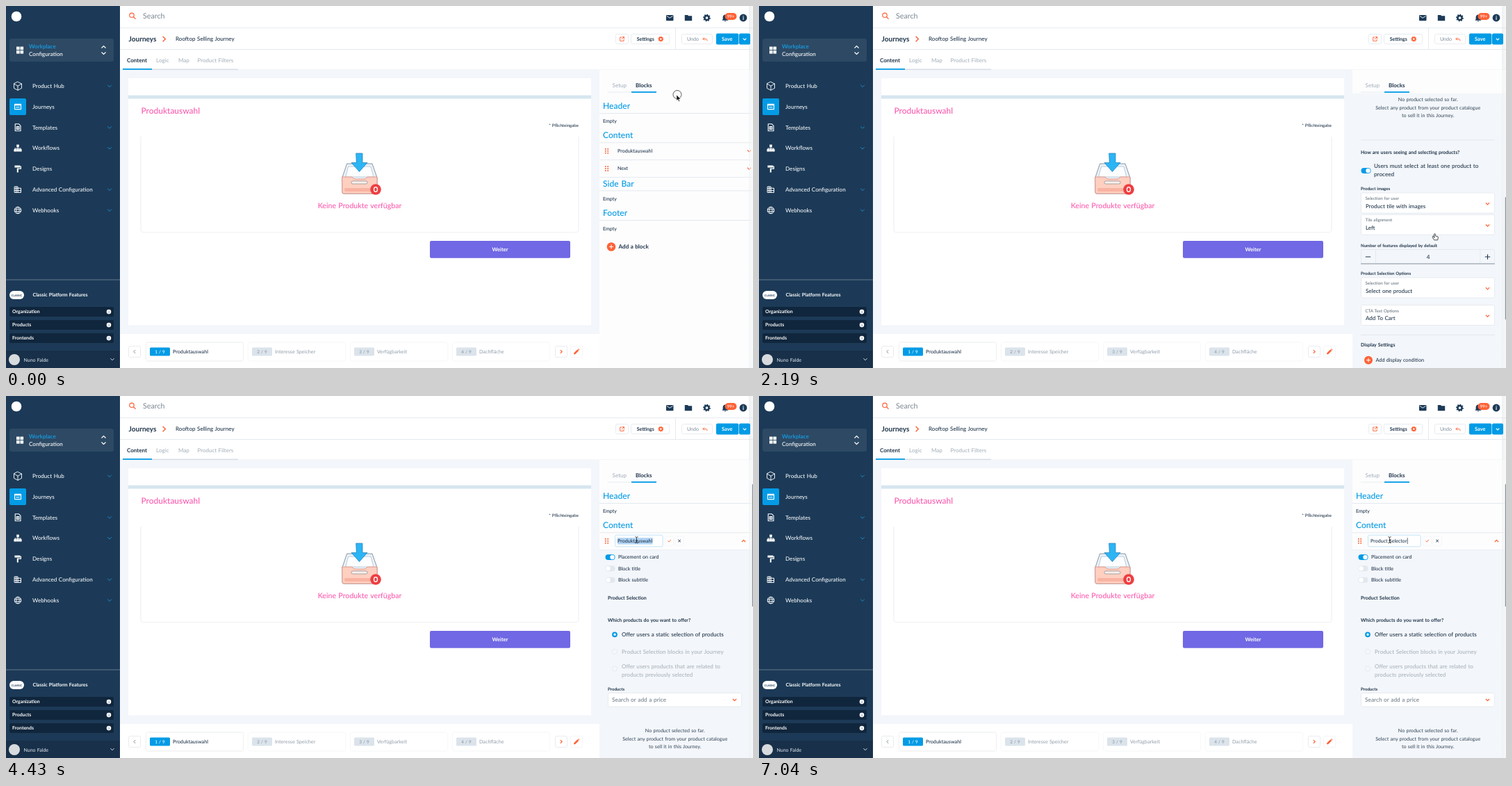
Write an HTML page that moves like this. It is 1075 by 521 pixels and loops after 8000 ms.

```html
<!DOCTYPE html>
<html lang="en">
<head>
<meta charset="utf-8">
<title>Journey builder</title>
<style>
  html, body { margin: 0; width: 100%; height: 100%; overflow: hidden; background: #fff; }
  svg { display: block; width: 100vw; height: 100vh; }
  text { font-family: Lato, "Open Sans", sans-serif; word-spacing: .06em; text-rendering: geometricPrecision; white-space: pre; }
  .card { filter: drop-shadow(0 .6px .8px rgba(40, 60, 80, .2)); }
</style>
</head>
<body>
<svg id="stage" viewBox="0 0 1075 521" preserveAspectRatio="none"></svg>
<script>
const NAVY = '#1c3a57', INK = '#20354b', BLUE = '#039be5', ORANGE = '#ff6136', PINK = '#fb5aae';
const GREY = '#a9b3bd', LINE = '#e2e7ec', WHITE = '#fff', TINT = '#f3f6fa';

// Drawing helpers
const text = (x, y, size, str, fill = INK, weight = 500, anchor = 'start') =>
  `<text x="${x}" y="${y}" font-size="${size}" fill="${fill}" font-weight="${weight}" text-anchor="${anchor}">${str}</text>`;
const bold = (x, y, size, str, fill = INK) => text(x, y, size, str, fill, 700);
const rect = (x, y, w, h, fill, r = 0, more = '') =>
  `<rect x="${x}" y="${y}" width="${w}" height="${h}" rx="${r}" fill="${fill}" ${more}/>`;
const frame = (x, y, w, h, stroke = LINE, r = 2, fill = WHITE) =>
  rect(x + .5, y + .5, w - 1, h - 1, fill, r, `stroke="${stroke}" stroke-width=".8"`);
const circle = (x, y, r, fill, more = '') => `<circle cx="${x}" cy="${y}" r="${r}" fill="${fill}" ${more}/>`;
const hline = (x, y, w, color = LINE, h = .8) => rect(x, y, w, h, color);
const stroke = (x, y, d, color, w = 1, fill = 'none') =>
  `<path transform="translate(${x} ${y})" d="${d}" fill="${fill}" stroke="${color}" stroke-width="${w}" stroke-linejoin="round" stroke-linecap="round"/>`;
const solid = (x, y, d, color) => `<path transform="translate(${x} ${y})" d="${d}" fill="${color}"/>`;
const chevron = (x, y, turn, color, s = 2.6, w = 1.2) =>
  `<path transform="translate(${x} ${y}) rotate(${turn})" d="M${-s} ${-s / 2}L0 ${s / 2}L${s} ${-s / 2}" fill="none" stroke="${color}" stroke-width="${w}"/>`;
const gear = (x, y, r, color) =>
  circle(x, y, r * .62, 'none', `stroke="${color}" stroke-width="${r * .5}"`) +
  circle(x, y, r * .9, 'none', `stroke="${color}" stroke-width="${r * .35}" pathLength="16" stroke-dasharray="1 1"`);
const info = (x, y, r, bg, fg) => circle(x, y, r, bg) + bold(x - r * .18, y + r * .55, r * 1.5, 'i', fg);
const plus = (x, y, r) => circle(x, y, r, ORANGE) + stroke(x, y, 'M-2.6 0H2.6M0-2.6V2.6', WHITE, 1.1);
const pencil = (x, y, k = 1) =>
  `<g transform="translate(${x} ${y}) scale(${k})">${solid(0, 0, 'M-4 4V2L1.5-3.5L3.5-1.5L-2 4ZM2.2-4.1L3-4.8L4.8-3L4.1-2.2Z', ORANGE)}</g>`;
const toggle = (x, y, on) =>
  rect(x - 7, y - 4, 14, 8, on ? BLUE : '#e1e8ee', 4) + circle(x + (on ? 3 : -3), y, 3.2, WHITE);
const radio = (x, y, on) => on
  ? circle(x, y, 2.8, WHITE, `stroke="${BLUE}" stroke-width="2.2"`)
  : circle(x, y, 3.6, '#f5f7fa', 'stroke="#e4e9ee" stroke-width=".8"');
const field = (y, label, value) =>
  frame(866, y, 193, 30) + text(872.5, y + 10.5, 6.2, label, '#66737f') +
  text(873, y + 22, 8, value) + chevron(1048.5, y + 16, 0, ORANGE);

function sidebar() {
  const items = ['Product Hub', 'Journeys', 'Templates', 'Workflows', 'Designs', 'Advanced Configuration', 'Webhooks'];
  const rowY = i => 115.2 + i * 29.8;
  let s = rect(0, 0, 164, 521, NAVY) + circle(15, 15, 7.3, WHITE);
  s += rect(5, 47, 150, 33, '#2d4964', 3);
  for (const [x, y] of [[15, 58.5], [20.5, 58.5], [15, 64], [20.5, 64]]) s += rect(x, y, 4.6, 4.6, WHITE);
  s += text(33, 61, 8.2, 'Workplace', '#14a5ef') + text(33, 71.8, 8.1, 'Configuration', WHITE);
  s += chevron(140.5, 59, 180, WHITE, 3) + chevron(140.5, 68, 0, WHITE, 3);
  s += rect(5, 133, 24, 24, BLUE, 2);
  items.forEach((name, i) => {
    s += text(38, rowY(i) + 2.7, 8.1, name, '#f3f6f9');
    if (![1, 4].includes(i)) s += chevron(149, rowY(i), 0, '#1988c6', 2.8, 1);
  });
  s += stroke(17, rowY(0), 'M0-6L5.5-3.2V3.2L0 6L-5.5 3.2V-3.2ZM-5.5-3.2L0 0L5.5-3.2M0 0V6', WHITE, .9);
  s += stroke(17, rowY(1), 'M-4.5-3.6H4.5V3.6H-4.5ZM-4.5-2.4H4.5M-2.3 .8H2.3', WHITE, 1.1);
  s += stroke(17, rowY(2), 'M-3.8-5H1.5L4-2.5V5H-3.8ZM-1.8-1.2H2V2.6H-1.8ZM0-1V2.5', WHITE, 1.1);
  s += solid(17, rowY(3), 'M-1.8-5H1.8V-1.5H.5V0H4.6V1.5H5.6V5H2V1.5H3.4V1H.5V1.5H1.8V5H-1.8V1.5H-.5V1H-3.4V1.5H-2V5H-5.6V1.5H-4.6V0H-.5V-1.5H-1.8Z', WHITE);
  s += solid(17, rowY(4), 'M-4.6-5H3.2V-4H5V.4H.8V5.2H-1.2V-.8H3.8V-2.8H3.2V-1.8H-4.6Z', WHITE);
  s += stroke(17, rowY(5), 'M-4.5-4.2H0V4.2H-4.5ZM0-2H4.5V4.2H0M-4.5-1.5H0M-4.5 1.4H4.5M-2.3-4V4', WHITE, 1);
  s += circle(17, rowY(6), 4.8, 'none', `stroke="${WHITE}" stroke-width="1"`) +
    stroke(17, rowY(6), 'M-4.5-1.6H4.5M-4.5 1.6H4.5M0-4.8C-3-2-3 2 0 4.8C3 2 3-2 0-4.8', WHITE, .9);

  s += hline(0, 393.6, 164, '#75879a') + rect(5, 410, 21, 12, WHITE, 6) + text(15.5, 417.5, 3.9, 'CLASSIC', NAVY, 700, 'middle');
  s += bold(38.5, 418.4, 7, 'Classic Platform Features', WHITE);
  ['Organization', 'Products', 'Frontends'].forEach((name, i) => {
    const y = 433 + i * 19;
    s += rect(5, y, 150, 14, '#10263d', 2) + bold(9, y + 9.4, 6.9, name, WHITE) + info(148, y + 7.1, 3.3, WHITE, NAVY);
  });
  s += rect(0, 496, 164, 25, '#183049') + circle(12, 509, 8, '#d8dbde');
  return s + text(25.5, 511.5, 7, 'Nuno Falde', '#d6dee6') + chevron(153, 508.5, 0, '#d6dee6', 2.6, 1);
}

function header() {
  let s = rect(1069, 0, 6, 521, 'url(#edge)');
  s += circle(181, 13.3, 3.2, 'none', `stroke="${ORANGE}" stroke-width="1.2"`) + stroke(183.6, 15.8, 'M0 0L2.6 2.6', ORANGE, 1.3);
  s += text(197, 17.6, 10.7, 'Search', '#7b8792', 400);
  s += rect(950, 13, 10.5, 8.2, NAVY, 1) + stroke(955.2, 15.4, 'M-4-.8L0 1.8L4-.8', WHITE, .9);
  s += solid(982, 17, 'M-5.2-4H-1L.2-2.8H5.2V4.2H-5.2Z', NAVY) + gear(1008.5, 17, 5, NAVY);
  s += solid(1035, 17.2, 'M-4.6 3.6L-3.4 2V-1C-3.4-3.4-1.8-4.8 0-4.8C1.8-4.8 3.4-3.4 3.4-1V2L4.6 3.6ZM-1.4 4.2H1.4C1 5.6-1 5.6-1.4 4.2', NAVY);
  s += rect(1034.5, 10, 17, 10, ORANGE, 5) + text(1043, 17.2, 6, '99+', WHITE, 500, 'middle') + info(1061, 17, 5.4, NAVY, WHITE);
  s += hline(164, 31, 911) + hline(164, 62, 911) + rect(963, 31, .8, 31, LINE);

  s += bold(176.5, 51, 10.1, 'Journeys') + chevron(227.5, 47.5, -90, ORANGE, 3.8, 1.4) + text(244, 50, 8.05, 'Rooftop Selling Journey');
  s += frame(877, 40, 19, 15) + stroke(886.5, 47.5, 'M-.5-2.6H-2.8V2.8H2.6V.5M.8-3H3V-.8M3-3L-.4 .4', ORANGE, .9);
  s += frame(899, 40, 56, 15) + bold(907.7, 50, 7.05, 'Settings') + gear(942.3, 47.5, 3.6, ORANGE);
  s += frame(972, 40, 45, 15) + text(980, 50, 7.1, 'Undo', '#8793a0') + stroke(1006, 48, 'M-3-.6H1C2.5-.6 3 .4 3 1.8M-1.2-2.4L-3-.6L-1.2 1.2', ORANGE, .9);
  s += rect(1022, 39.5, 32.4, 16, BLUE, 2) + bold(1030, 50, 7.4, 'Save', WHITE);
  s += rect(1055, 39.5, 16, 16, BLUE, 2) + chevron(1063, 47.7, 0, WHITE, 2.2);

  s += bold(174, 80.5, 8, 'Content');
  s += text(216, 80.5, 8.1, 'Logic', GREY) + text(248, 80.5, 8, 'Map', GREY) + text(275.5, 80.5, 7.95, 'Product Filters', GREY);
  return s + hline(164, 91.4, 911, '#eef1f4') + hline(210, 90.6, 124, '#cfd8e0', 1.2) + hline(168, 90, 42, BLUE, 1.8);
}

function canvasArea() {
  let s = rect(164, 92, 690, 380, TINT) + rect(176, 104, 666, 355.5, WHITE) + rect(176, 128.5, 666, 5, '#d6e6f0');
  s += text(194.5, 155.3, 11.95, 'Produktauswahl', PINK) + text(824, 174.3, 6.1, '* Pflichteingabe', INK, 500, 'end');
  s += rect(194.5, 186, 629, 139, WHITE, 3, 'class="card"') + rect(193, 182, 632, 6, WHITE);

  // Empty tray with arrow
  const edge = '#6b7a89';
  s += stroke(0, 0, 'M491 227H527L534 247V268Q534 270 532 270H486Q484 270 484 268V247Z', edge, .8, '#eaf3fa');
  s += stroke(0, 0, 'M493 231H525L529 246H489Z', '#a9b8c6', .7, '#fbfdff');
  s += stroke(0, 0, 'M484 246H498Q500 249 503 249H515Q518 249 520 246H534V268Q534 270 532 270H486Q484 270 484 268Z', '#d88c7f', .8, '#ffcfc0');
  s += rect(487, 262, 40, 5, '#f9b3a2', 2) + rect(497, 252, 23, 4, '#fff0ea', 2, `stroke="${edge}" stroke-width=".6"`);
  s += stroke(508.5, 212, 'M-4.5 0H4.5V13.5H11.5L0 26.5L-11.5 13.5H-4.5Z', '#2e86bc', .8, '#2bb5f5');
  s += circle(532, 264, 7.8, '#ee3e42') + `<ellipse cx="532" cy="264" rx="2.5" ry="3.4" fill="none" stroke="#fff" stroke-width="1.3"/>`;
  s += text(509, 290.8, 10.6, 'Keine Produkte verfügbar', PINK, 500, 'middle');
  s += rect(610, 338, 202, 24.7, '#7068e4', 2) + text(711, 353, 7.6, 'Weiter', WHITE, 700, 'middle');

  s += rect(164, 472, 690, 49, WHITE) + frame(176, 489, 18, 17) + chevron(185, 497.5, 90, '#7d8a97', 2.4, 1);
  ['Produktauswahl', 'Interesse Speicher', 'Verfügbarkeit', 'Dachfläche'].forEach((name, i) => {
    const x = 202 + i * 147, on = i === 0;
    s += rect(x, 484.5, 139, 26, WHITE, 2, on ? 'class="card"' : 'class="card" opacity=".5"');
    s += rect(x + 5, 491.5, 29, 12, on ? BLUE : '#dbe3eb', 1.5) +
      text(x + 19.5, 499.8, 6.4, `${i + 1} / 9`, on ? WHITE : '#8d9aa8', 500, 'middle');
    s += text(x + 38, 500, 7.2, name, on ? INK : '#98a4b0');
  });
  return s + frame(790, 489, 18, 17) + chevron(799, 497.5, -90, ORANGE, 2.4, 1.2) + frame(812, 489, 18, 17, '#f0f3f5') + pencil(821, 497.5, .95);
}

function settings() {
  let s = rect(854, 221, 221, 647, TINT);
  [['Placement on card', 232], ['Block title', 248.3], ['Block subtitle', 264.7]].forEach(([name, y], i) => {
    s += toggle(869.5, y, i === 0) + text(881, y + 2.4, 7.1, name);
  });
  s += bold(866, 293, 7, 'Product Selection') + bold(866, 325.3, 6.95, 'Which products do you want to offer?');
  s += radio(876, 343.3, true) + text(886, 346.2, 8.1, 'Offer users a static selection of products');
  s += radio(876, 368) + text(886, 370.7, 8.1, 'Product Selection blocks in your Journey', GREY);
  s += radio(876, 392.5) + text(886, 391.7, 8.1, 'Offer users products that are related to', GREY) + text(886, 404, 8.1, 'products previously selected', GREY);
  s += bold(866, 423.7, 6.1, 'Products') + frame(866, 427, 193, 20.5) + text(872, 440, 8.3, 'Search or add a price', '#74808c') + chevron(1048.5, 437.3, 0, ORANGE);
  ['No product selected so far.', 'Select any product from your product catalogue', 'to sell it in this Journey.'].forEach((str, i) => {
    s += text(962.7, 484 + i * 11.5, 7.1, str, '#3f5062', 500, 'middle');
  });
  s += hline(866, 539.5, 193) + bold(866, 559.6, 6.95, 'How are users seeing and selecting products?');
  s += toggle(873.5, 584, true) + text(885, 580, 8.2, 'Users must select at least one product to') + text(885, 592, 8.2, 'proceed');
  s += bold(866, 612, 6.1, 'Product images') + field(615.5, 'Selection for user', 'Product tile with images') + field(646.8, 'Tile alignment', 'Left');
  s += bold(866, 694, 6.1, 'Number of features displayed by default') + frame(866, 697, 193, 21, LINE, 2, TINT) + hline(866, 717.5, 193, '#8b96a1', 1);
  s += rect(887, 698, .8, 19, LINE) + rect(1037.5, 698, .8, 19, LINE);
  s += stroke(876.5, 708, 'M-3.3 0H3.3', INK, 1.1) + text(963, 711, 8.1, '4', INK, 500, 'middle') + stroke(1048.5, 708, 'M-3.3 0H3.3M0-3.3V3.3', INK, 1.1);
  s += bold(866, 734, 6.1, 'Product Selection Options') + field(737.5, 'Selection for user', 'Select one product') + field(777, 'CTA Text Options', 'Add To Cart');
  return s + hline(866, 820, 193) + bold(866, 837, 6.95, 'Display Settings') + plus(877, 856.7, 6) + text(887.5, 859.3, 7.25, 'Add display condition');
}

function panel() {
  const title = (y, str) => text(859, y, 12.1, str, BLUE) + hline(854, y + 6, 221, '#dfe5ea');
  const empty = y => text(859, y, 7.05, 'Empty');
  const dots = y => [-3, 0, 3].map(d => circle(862.8, y + d, 1, ORANGE) + circle(866.2, y + d, 1, ORANGE)).join('');
  let s = rect(854, 92, 221, 429, '#fdfdfe');
  s += text(872.5, 117, 8.1, 'Setup', GREY) + bold(906, 117, 8, 'Blocks');
  s += hline(866, 123.6, 34, '#e3e8ec') + hline(900, 123, 36, BLUE, 1.8);
  s += `<g clip-path="url(#view)"><g id="scroll">${title(148, 'Header')}${empty(168)}${title(190.4, 'Content')}`;
  s += dots(208.7) + hline(854, 221, 221) + `<g id="toggleIcon">${chevron(0, 0, 0, ORANGE)}</g>`;
  s += `<g id="label">${text(880, 211, 7.1, 'Produktauswahl')}</g><g id="hover">${pencil(939.5, 208.7, .75)}</g>`;
  s += `<g id="editor">${rect(876.5, 200.2, 68, 16.6, WHITE, 2, 'id="box" stroke="#bfe1f6" stroke-width=".9"')}
    ${rect(880, 204, 50.5, 9.5, '#b3d5f6', 0, 'id="selection"')}${text(880, 211, 7.1, '').replace('<text', '<text id="typed"')}
    ${rect(0, 204, .7, 9, INK, 0, 'id="caret"')}
    <g id="actions">${frame(2.5, 201.5, 13, 14, '#f0f3f5') + frame(17, 201.5, 13, 14, '#f0f3f5')}
    ${stroke(9, 208.5, 'M-2 .2L-.6 1.6L2-1.5', ORANGE, .9) + stroke(23.5, 208.5, 'M-1.5-1.5L1.5 1.5M1.5-1.5L-1.5 1.5', INK, 1)}</g></g>`;
  s += `<g clip-path="url(#fold)">${settings()}</g>`;
  s += `<g id="rest">${dots(234) + text(880, 236.4, 7.1, 'Next') + hline(854, 246, 221)}<g id="nextIcon">${chevron(1069.5, 234, 0, ORANGE)}</g>
    ${title(259.5, 'Side Bar') + empty(280) + title(302, 'Footer') + empty(322.8)}
    ${plus(871, 346.5, 6.3) + bold(881.5, 349.2, 8.1, 'Add a block')}</g></g></g>`;
  return s + rect(1069, 92, 6, 429, 'url(#edge)', 0, 'opacity=".6"') + rect(1073.8, 127, 1.2, 176, '#8d9299', 0, 'id="thumb"');
}

const pointers =
  `<g id="arrow">${stroke(0, 0, 'M0 0V8.2L1.9 6.5L3.2 9.4L4.5 8.8L3.2 6H5.8Z', WHITE, .5, '#111')}</g>` +
  `<g id="hand">${stroke(0, 0, 'M-.8 0Q0-1 .8 0V3L4 3.8Q5 4 4.8 5L4.2 8.8H-.8L-3.2 5.4Q-3-.0 -.8 5.4Z', '#222', .8, WHITE)}</g>` +
  `<g id="beam">${stroke(0, 0, 'M-1.8-4.3Q0-4.3 0-3.3Q0-4.3 1.8-4.3M0-3.3V3.6M-1.8 4.6Q0 4.6 0 3.6Q0 4.6 1.8 4.6M-1 .8H1', '#111', .7)}</g>`;

const $ = id => document.getElementById(id);
$('stage').innerHTML = `<defs>
  <linearGradient id="edge"><stop offset="0" stop-color="#eceff1" stop-opacity=".9"/><stop offset="1" stop-color="#f7f8f9"/></linearGradient>
  <clipPath id="view"><rect x="854" y="125.5" width="221" height="396"/></clipPath>
  <clipPath id="fold"><rect id="foldBox" x="854" y="221.5" width="221" height="0"/></clipPath></defs>` +
  rect(0, 0, 1075, 521, WHITE) + header() + canvasArea() + panel() + sidebar() +
  circle(966, 127.5, 6, 'none', 'id="ring" stroke="#333" stroke-width=".8"') + pointers;

// Timelines: [start ms, value...]
const LOOP = 8000, OPEN = 647;
const pointer = [
  [0, 'arrow', 965, 128], [110, 'hand', 1040, 222], [260, 'arrow', 1036, 250], [370, 'arrow', 1020, 273],
  [490, 'arrow', 1000, 274], [610, 'arrow', 982, 258], [730, 'arrow', 970, 234], [840, 'hand', 964, 214],
  [960, 'hand', 962, 207], [1370, 'arrow', 966, 244], [1490, 'arrow', 975, 310], [1600, 'arrow', 982, 355],
  [1720, 'arrow', 983, 361], [1960, 'arrow', 982, 349], [2080, 'arrow', 976, 336], [2190, 'hand', 972.5, 328],
  [2420, 'arrow', 970, 315], [2530, 'arrow', 966, 298], [2650, 'arrow', 962, 282], [2770, 'arrow', 960, 273],
  [2880, 'arrow', 958, 260], [3000, 'arrow', 954, 243], [3120, 'arrow', 949, 226], [3240, 'hand', 944, 213],
  [3360, 'hand', 941, 209], [3480, 'hand', 939, 207], [3840, 'beam', 930, 208], [3950, 'beam', 918, 208],
  [4070, 'beam', 911, 207], [4190, 'beam', 908.5, 206], [4430, 'beam', 907.5, 207]];
const scrolling = [[0, 0], [2080, 140], [2190, 347], [2300, 450], [2420, 488], [2530, 300], [2650, 90], [2770, 0]];
const folding = [[0, 0], [1080, 37], [1220, OPEN]];
const hovering = [[0, false], [110, true], [260, false], [840, true], [1080, false], [3120, true], [3720, false]];
const PHRASE = 'Product Selector';
const typing = [[0, -1], [4910, 0], [5030, 1], [5260, 2], [5380, 4], [5500, 5], [5620, 6], [5860, 7], [5970, 8],
  [6090, 9], [6330, 10], [6450, 11], [6560, 12], [6680, 13], [6920, 15], [7040, 16]];

const at = (table, t) => table.findLast(row => row[0] <= t).slice(1);
const show = (id, on) => $(id).setAttribute('display', on ? 'inline' : 'none');
const move = (id, x, y, more = '') => $(id).setAttribute('transform', `translate(${x} ${y}) ${more}`);

function draw(t) {
  const [kind, x, y] = at(pointer, t);
  for (const id of ['arrow', 'hand', 'beam']) show(id, id === kind);
  move(kind, x, y);
  show('ring', t < 110);

  const [scroll] = at(scrolling, t), [fold] = at(folding, t), full = fold === OPEN;
  move('scroll', 0, -scroll);
  move('rest', 0, fold);
  $('foldBox').setAttribute('height', fold);
  move('toggleIcon', full ? 1061.5 : 1069.5, 208.7, fold ? 'rotate(180)' : '');
  move('nextIcon', full ? -8 : 0, 0);
  show('thumb', full);
  move('thumb', 0, scroll * .427);

  const editing = t >= 3720, [count] = at(typing, t), selected = count < 0;
  show('hover', at(hovering, t)[0]);
  show('label', !editing);
  show('editor', editing);
  if (!editing) return;
  const value = selected ? 'Produktauswahl' : PHRASE.slice(0, count);
  const width = 20.6 + 3.5 * value.length;
  $('typed').textContent = value;
  $('box').setAttribute('width', width - 1);
  move('actions', 876 + width, 0);
  show('selection', selected);
  show('caret', !selected);
  $('caret').setAttribute('x', 880.3 + $('typed').getComputedTextLength());
}

const start = performance.now();
function tick() {
  draw((performance.now() - start) % LOOP);
  requestAnimationFrame(tick);
}
tick();
</script>
</body>
</html>
```
